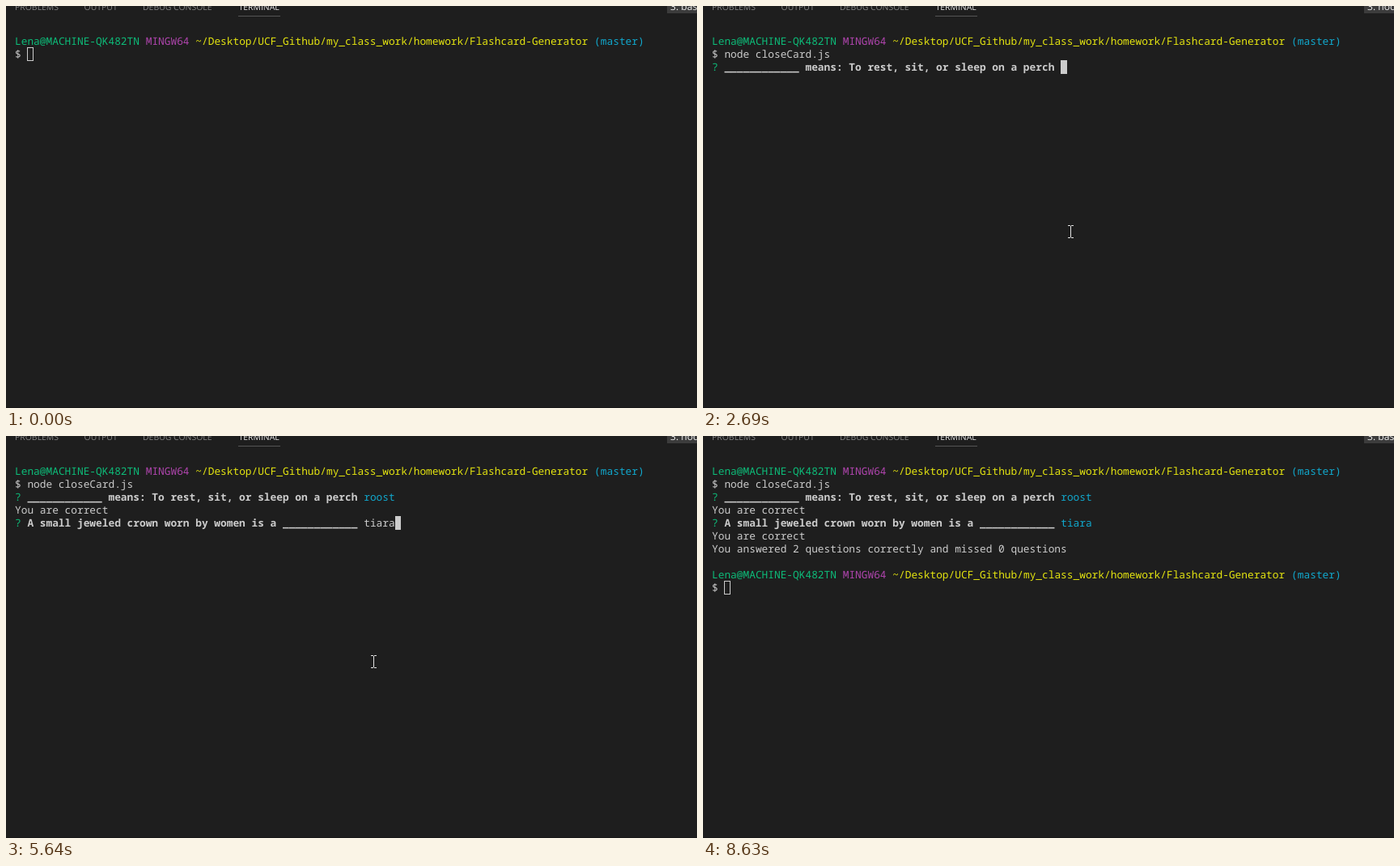
An HTML page for the animation above (8.77 s loop, 854 px wide and 497 px high).

```html
<!DOCTYPE html>
<html lang="en">
<head>
<meta charset="utf-8">
<title>Flashcard terminal</title>
<style>
  html, body { margin: 0; width: 100%; height: 100%; overflow: hidden; background: #1e1e1e; }
  svg { display: block; }
  text { white-space: pre; text-rendering: geometricPrecision; }
  .term { font: 12.83px "Noto Sans Mono", monospace; fill: #ccc; }
  .term .bold { font-weight: 700; }
  .green { fill: #0dbc79; }
  .magenta { fill: #b045ae; }
  .yellow { fill: #e5e510; }
  .cyan { fill: #11a8cd; }
  .tabs { font: 10.45px "Open Sans", sans-serif; fill: #858585; }
  .tabs .active { fill: #e7e7e7; }
  .picker { font: 12.1px "Open Sans", sans-serif; fill: #f0f0f0; }
</style>
</head>
<body>
<svg id="stage" width="854" height="497" viewBox="0 0 854 497">
  <rect width="854" height="497" fill="#1e1e1e"/>
  <rect y="496" width="854" height="1" fill="#181818"/>
  <g class="tabs">
    <text x="11" y="5">PROBLEMS</text>
    <text x="96.5" y="5">OUTPUT</text>
    <text x="169" y="5">DEBUG CONSOLE</text>
    <text x="287.5" y="5" class="active">TERMINAL</text>
    <rect x="287" y="12" width="52" height="1" fill="#555"/>
  </g>
  <rect x="817" width="37" height="9" fill="#3c3c3c"/>
  <text id="picker" class="picker" x="821" y="5"></text>
  <g id="term" class="term"></g>
  <rect id="caret"/>
  <path id="pointer" fill="#e4e4e4" d="M-3 0h3v1h-3zM1 0h3v1h-3zM0 1h1v14h-1zM-3 15h3v1h-3zM1 15h3v1h-3z"/>
</svg>
<script>
const LOOP = 8770;
const CELL = 7.7, ROW = 16, LEFT = 11;
const RUN = 2160, ASK = 2690, NEXT = 4250, DONE = 6450;
const $ = id => document.getElementById(id);
const colX = col => LEFT + col * CELL;
const items = [];

function put(row, col, text, style = '', from = 0, until = LOOP) {
  const node = document.createElementNS('http://www.w3.org/2000/svg', 'text');
  node.setAttribute('x', colX(col));
  node.setAttribute('y', 48 + row * ROW);
  node.setAttribute('class', style);
  node.textContent = text;
  $('term').append(node);
  items.push({ node, from, until });
}

function prompt(row, from) {
  put(row, 0, 'Lena@MACHINE-QK482TN', 'green', from);
  put(row, 21, 'MINGW64', 'magenta', from);
  put(row, 29, '~/Desktop/UCF_Github/my_class_work/homework/Flashcard-Generator', 'yellow', from);
  put(row, 93, '(master)', 'cyan', from);
  put(row + 1, 0, '$', '', from);
}

// Caret stops: [time, row, column]
const carets = [[0, 1, 2], [1220, 1, 7], [1520, 1, 20], [RUN, 2, 0]];

function question(row, text, answer, from, keys, enter) {
  put(row, 0, '?', 'green', from);
  put(row, 2, text, 'bold', from);
  const col = text.length + 3;
  carets.push([from, row, col]);
  keys.forEach((time, i) => {
    put(row, col + i, answer[i], '', time, enter);
    carets.push([time, row, col + i + 1]);
  });
  put(row, col, answer, 'cyan', enter);
  put(row + 1, 0, 'You are correct', '', enter);
}

prompt(0, 0);
put(1, 2, 'clear', '', 1220, 1520);
put(1, 2, 'node closeCard.js', '', 1520);
const blank = '_'.repeat(12);
question(2, blank + ' means: To rest, sit, or sleep on a perch', 'roost',
  ASK, [3470, 3545, 3620, 3800, 3880], NEXT);
question(4, 'A small jeweled crown worn by women is a ' + blank, 'tiara',
  NEXT, [5120, 5270, 5350, 5490, 5640], DONE);
put(6, 0, 'You answered 2 questions correctly and missed 0 questions', '', DONE);
prompt(8, DONE);
carets.push([DONE, 9, 2]);

function drawCaret(t) {
  const [, row, col] = carets.findLast(stop => stop[0] <= t);
  const hollow = t < 590 || t >= 8630;
  const x = Math.round(colX(col)), w = Math.round(colX(col + 1)) - x;
  const inset = hollow ? 0.5 : 0;
  const attrs = {
    x: x + inset, y: 35 + row * ROW + inset,
    width: w - 2 * inset, height: 17 - 2 * inset,
    fill: hollow ? 'none' : '#ccc', stroke: hollow ? '#ccc' : 'none'
  };
  for (const name in attrs) $('caret').setAttribute(name, attrs[name]);
}

// The pointer is sampled in discrete steps, easing in and out of rest.
function pointerAt(t) {
  const glide = (a, b, p) => a.map((v, i) => Math.round(v + (b[i] - v) * p));
  if (t < 70 || t >= 8330) return null;
  if (t < 520) {
    const step = Math.min(4, Math.floor((t - 70) / 75));
    return glide([459, 271], [672, 405], (1 - step / 4) ** 2);
  }
  const step = t < 7710 ? 0 : Math.floor((t - 7710) / 77.5) + 1;
  return glide([454, 271], [850, 484], (step / 8) ** 1.5);
}

function draw(t) {
  for (const { node, from, until } of items)
    node.style.display = t >= from && t < until ? '' : 'none';
  $('picker').textContent = t >= RUN && t < DONE ? '3: node' : '3: bash';
  drawCaret(t);
  const spot = pointerAt(t);
  $('pointer').style.display = spot ? '' : 'none';
  if (spot) $('pointer').setAttribute('transform', `translate(${spot})`);
}

const start = performance.now();
function tick() {
  draw((performance.now() - start) % LOOP);
  requestAnimationFrame(tick);
}
tick();
</script>
</body>
</html>
```
